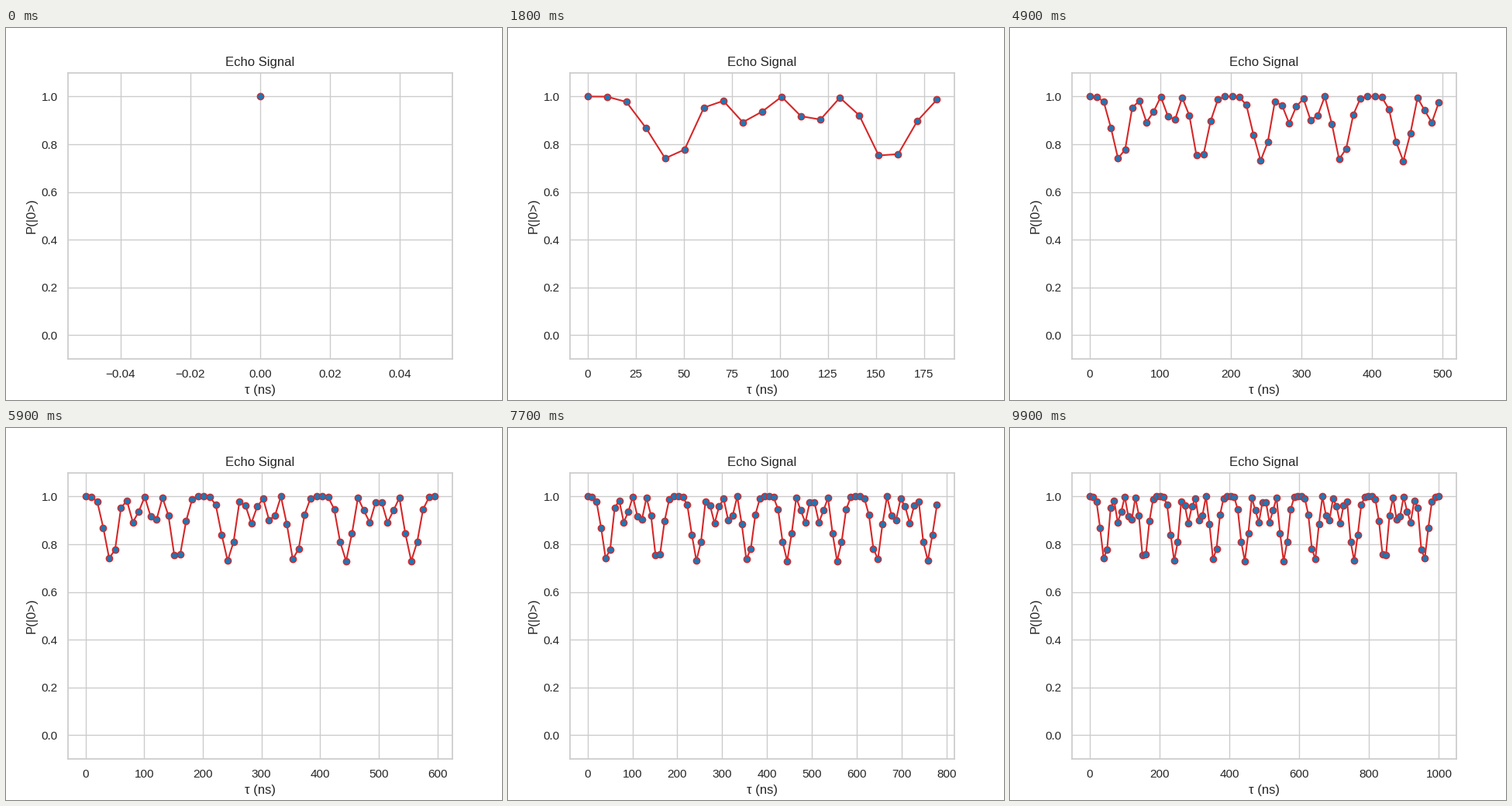
These frames come from a looping animation (640x480 px, 10 s). A matplotlib script:

```python
import numpy as np
import matplotlib.pyplot as plt
from matplotlib.animation import FuncAnimation

FRAMES = 100
INK = "0.15"
RULE = "0.8"

plt.rcParams.update({
    "font.family": ["Liberation Sans", "DejaVu Sans"],
    "font.size": 12,
    "axes.titlesize": 12,
    "axes.labelsize": 12,
    "xtick.labelsize": 11,
    "ytick.labelsize": 11,
    "text.color": INK,
    "axes.labelcolor": INK,
    "xtick.color": INK,
    "ytick.color": INK,
    "axes.edgecolor": RULE,
    "axes.linewidth": 1.25,
    "axes.axisbelow": True,
    "axes.grid": True,
    "grid.color": RULE,
    "grid.linewidth": 1,
    "xtick.major.size": 6,
    "ytick.major.size": 6,
    "xtick.bottom": False,
    "ytick.left": False,
    "lines.solid_capstyle": "round",
})


def echo(t):
    """Echo probability with three commensurate modulation tones."""
    depth = np.prod([np.sin(k * np.pi * t / 200) ** 2 for k in (1, 2, 3)], axis=0)
    return 1 - depth + depth ** 2 / 3


tau = np.linspace(0, 1000, FRAMES)
signal = echo(tau)

fig, ax = plt.subplots(figsize=(6.4, 4.8), dpi=100)
fig.subplots_adjust(left=0.125, right=0.9, bottom=0.11, top=0.88)
ax.set(title="Echo Signal", xlabel="τ (ns)", ylabel="P(|0>)", ylim=(-0.1, 1.1))
line, = ax.plot([], [], "o-", color="tab:red", markerfacecolor="tab:blue",
                lw=1.5, markersize=6)


def update(i):
    line.set_data(tau[:i + 1], signal[:i + 1])
    ax.relim()
    ax.autoscale_view(scaley=False)
    return line,


anim = FuncAnimation(fig, update, frames=FRAMES, init_func=lambda: update(0),
                     interval=100, repeat=True, repeat_delay=0)
plt.show()
```
